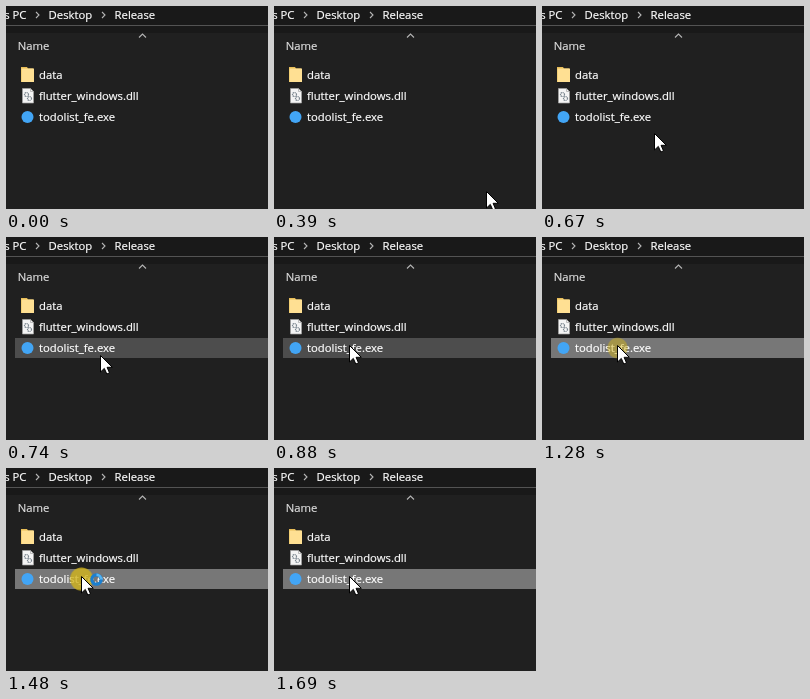
These frames come from a looping animation (262x203 px, 1.9 s). An HTML page:

```html
<!DOCTYPE html>
<html lang="en">
<head>
<meta charset="utf-8">
<title>File list</title>
<style>
  html, body { margin: 0; width: 100%; height: 100%; overflow: hidden; background: #202020; }
  svg { display: block; width: 262px; height: 203px; }
  text { font: 11.3px "Open Sans", "Noto Sans", sans-serif; fill: #fff; stroke: #fff; stroke-width: .2; }
  .chevron { fill: none; stroke: #b4b4b4; stroke-width: 1.1; }
</style>
</head>
<body>
<svg viewBox="0 0 262 203">
  <rect width="262" height="203" fill="#202020"/>
  <rect width="262" height="27" fill="#191919"/>
  <rect y="19" width="262" height="1" fill="#535353"/>

  <text x="20.5" y="13" text-anchor="end">This PC</text>
  <text x="42.600" y="13">Desktop</text>
  <text x="108.600" y="13">Release</text>
  <path class="chevron" d="M30 6l3 3-3 3M96 6l3 3-3 3"/>
  <path class="chevron" d="M133 31.500l3.500-3.500 3.500 3.500"/>
  <text x="11.700" y="44" style="fill:#dedede;stroke:#dedede">Name</text>

  <rect id="row" x="9" y="101" width="253" height="20" fill="#4d4d4d" opacity="0"/>

  <!-- folder -->
  <path d="M15 61h6l1 1.500h5V76H15z" fill="#e8bd57"/>
  <path d="M15.500 62.500H28V76H15.500z" fill="#ffe093"/>
  <!-- library file -->
  <path d="M16.500 82.500h8l3 3v11.500h-11z" fill="#f4f4f4" stroke="#a5a5a5" stroke-width=".7"/>
  <path d="M24.500 82.500v3h3" fill="none" stroke="#a5a5a5" stroke-width=".7"/>
  <g fill="none" stroke="#7c8790" stroke-width="1.2" stroke-dasharray="1.2 .5">
    <circle cx="20.500" cy="88.500" r="2"/>
    <circle cx="23.500" cy="92.500" r="2"/>
  </g>
  <circle cx="21.500" cy="111" r="6" fill="#42a5f5"/>

  <text x="33" y="73">data</text>
  <text x="33" y="94">flutter_windows.dll</text>
  <text x="33" y="115">todolist_fe.exe</text>

  <g transform="translate(75.500 111)">
    <circle id="click" r="11.500" fill="#d2b51c" opacity="0"/>
  </g>
  <g id="busy" opacity="0" fill="none">
    <circle cx="90.500" cy="111.500" r="4.700" stroke="#1b7fd0" stroke-width="3.200"/>
    <path d="M90.500 106.800a4.700 4.700 0 0 1 4.700 4.700" stroke="#55b4f2" stroke-width="2.400"/>
  </g>
  <path id="pointer" d="M.5 .5V17l3.800-3.600L6.800 19l2.700-1.100L7.100 12.300h5.200z"
        fill="#fff" stroke="#000" opacity="0"/>
</svg>
<script>
  const LOOP = 1900;

  // Each step is [start in ms, properties held until the next step].
  function hold(id, steps) {
    const frames = steps.map(([time, props]) =>
      ({ offset: time / LOOP, easing: "step-end", ...props }));
    frames.push({ ...frames[frames.length - 1], offset: 1 });
    document.getElementById(id).animate(frames, { duration: LOOP, iterations: Infinity });
  }

  const at = (x, y) => ({ opacity: 1, transform: `translate(${x}px, ${y}px)` });
  const path = [[212, 185], [188, 170], [161, 153], [134, 139],
                [112, 127], [94, 118], [81, 111], [75, 108]];
  hold("pointer", [
    [0, { ...at(212, 185), opacity: 0 }],
    ...path.map(([x, y], i) => [390 + 70 * i, at(x, y)])
  ]);

  hold("row", [
    [0, { opacity: 0, fill: "#4d4d4d" }],
    [740, { opacity: 1, fill: "#4d4d4d" }],
    [1280, { opacity: 1, fill: "#777777" }]
  ]);

  const ring = (opacity, scale) => ({ opacity, transform: `scale(${scale})` });
  hold("click", [
    [0, ring(0, 0.85)],
    [1280, ring(0.5, 0.88)],
    [1350, ring(0.62, 0.95)],
    [1410, ring(0.75, 1)],
    [1480, ring(0.8, 1)],
    [1550, ring(0.4, 1.05)],
    [1690, ring(0, 1)]
  ]);

  hold("busy", [[0, { opacity: 0 }], [1480, { opacity: 1 }], [1690, { opacity: 0 }]]);
</script>
</body>
</html>
```
